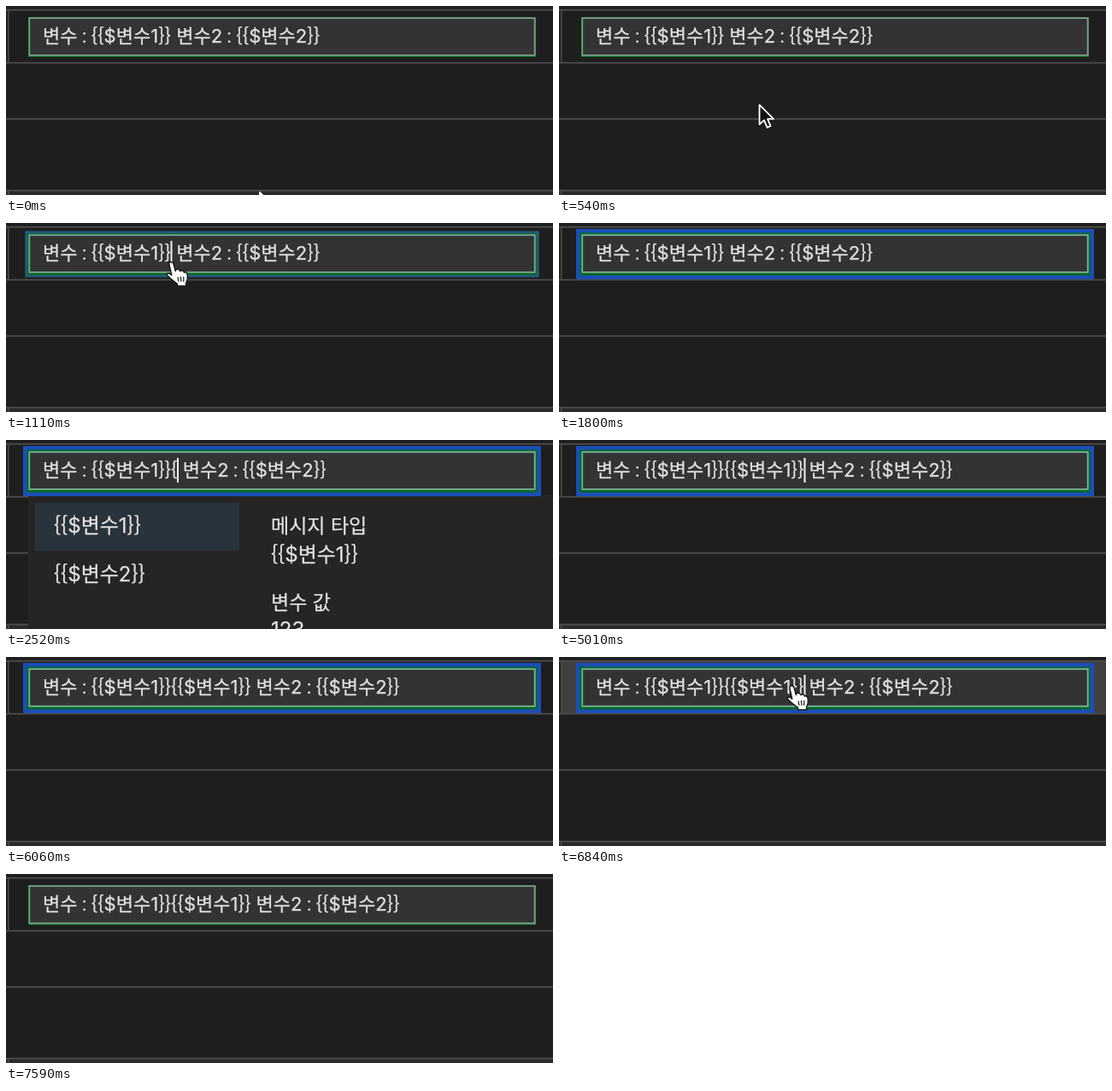
These frames come from a looping animation (640x222 px, 7620 ms). An HTML page:

```html
<!DOCTYPE html>
<html lang="ko">
<head>
<meta charset="utf-8">
<title>변수 자동 완성</title>
<style>
html, body { margin: 0; width: 100%; height: 100%; overflow: hidden; background: #1e1e1e; }
svg { display: block; width: 100%; height: 100%; }
text { font: 22px "Noto Sans CJK KR", "Noto Sans CJK", sans-serif; fill: #e2e2e2; stroke: #e2e2e2; stroke-width: .25px; white-space: pre; }
.num { font-family: Inter, Roboto, sans-serif; }
.colon { font-family: Roboto, sans-serif; }
#popup text { font-size: 24px; }
#popup .label { font-size: 23px; }
.rule { fill: #4c4c4c; }
</style>
</head>
<body>
<svg viewBox="0 0 640 222">
  <defs>
    <filter id="soft" x="-5%" y="-20%" width="110%" height="140%"><feGaussianBlur stdDeviation="0.7"/></filter>
  </defs>
  <rect width="640" height="222" fill="#1e1e1e"/>
  <rect y="217" width="640" height="5" fill="#2a2a2a"/>
  <rect id="hover" x="3" y="5" width="637" height="61" fill="#404040"/>
  <g class="rule">
    <rect y="3.8" width="640" height="1.8"/>
    <rect y="65.8" width="640" height="1.8"/>
    <rect y="131.8" width="640" height="1.8"/>
    <rect y="215.8" width="640" height="1.8"/>
    <rect x="2" y="5" width="1.5" height="61"/>
    <rect x="2" y="217" width="1.5" height="5"/>
  </g>

  <g id="popup">
    <rect x="26" y="66" width="614" height="156" fill="#252526"/>
    <rect x="34" y="73.5" width="239" height="57" fill="#29333c"/>
    <text x="56" y="109">{{$변수1}}</text>
    <text x="56" y="166">{{$변수2}}</text>
    <text x="310" y="109" class="label">메시지 타입</text>
    <text x="310" y="143">{{$변수1}}</text>
    <text x="310" y="199" class="label">변수 값</text>
    <text x="310" y="231">123</text>
  </g>

  <rect id="glow" fill="#07691f" filter="url(#soft)"/>
  <rect id="ring" fill="none" filter="url(#soft)"/>
  <rect id="field" x="27.3" y="14.2" width="591.4" height="43.6" fill="#333" stroke-width="1.8"/>
  <rect x="28.2" y="15" width="1.3" height="42" fill="#0c5a24"/>
  <text id="value" x="43" y="43"></text>
  <rect id="caret" y="21" width="2" height="29" fill="#f2f2f2"/>

  <g id="pointer" stroke-linejoin="round">
    <path id="arrow" d="M0 0V23L5.4 18L9 26.5L13 24.8L9.4 16.6H16.5Z" fill="#111" stroke="#fff" stroke-width="1.8"/>
    <g id="hand" stroke="#151515" stroke-width="1.4">
      <path fill="#fff" d="M-1 3C-2-.8 3-1.5 4 2L6.3 10.5C7 8 7 8.5 8 8.6C10 8 11.4 9 11.8 10.6C14 9 16 10.2 16.4 12C19 11 20 13 20.3 15.5C21 20 20 22 18.6 24.5V28H8.5V25.5C5 23-1 18.5-3.6 15C-4.5 12.5-1.5 12 1.8 15.2Z"/>
      <path fill="none" stroke-width="1.2" d="M9 17.5L10 23M12.4 17L13 23M15.8 17V23"/>
    </g>
  </g>
</svg>
<script>
const LOOP = 7620, BLINK = 450, BLUR = 7260;
const $ = id => document.getElementById(id);

// What stands between the two halves of the text, and where the caret is
const edits = [
  { from: 1050, added: "", caret: 192.5 },
  { from: 2280, added: "{", caret: 200 },
  { from: 3810, added: "{{$변수1}}", caret: 286.5 }
];

// The pointer enters, rests on the field, then leaves
const visits = [
  { enter: 0, rest: 960, leave: 1260, exit: 1590, hover: 1110,
    start: [297, 219], spot: [192, 46], end: [242, 232] },
  { enter: 6230, rest: 6750, leave: 7020, exit: 7530, hover: 6600,
    start: [302, 188], spot: [271, 34], end: [306, 226] }
];

function ease(from, to, t) {
  const p = Math.min(1, Math.max(0, (t - from) / (to - from)));
  return p * p * (3 - 2 * p);
}

// Rises at "on", falls at "off"
const pulse = (t, on, off, rise, fall = rise) =>
  ease(on, on + rise, t) * (1 - ease(off, off + fall, t));

const mix = (a, b, p) => a.map((v, i) => v + (b[i] - v) * p);
const rgb = (a, b, p) => `rgb(${mix(a, b, p).map(Math.round)})`;

function set(id, attrs) {
  for (const key in attrs) $(id).setAttribute(key, attrs[key]);
}

function write(el, str) {
  if (el.dataset.now === str) return;
  el.dataset.now = str;
  el.innerHTML = str
    .replace(/[$\d]+/g, m => `<tspan class='num'>${m}</tspan>`)
    .replace(/ : /g, m => `<tspan class='colon'>${m}</tspan>`);
}

// Rectangle around the field, grown by "out" on each side
const around = out => ({ x: 26 - out, y: 13 - out, width: 594 + 2 * out, height: 47 + 2 * out });

function drawField(t, added) {
  const f = pulse(t, 990, BLUR, 270, 240);
  const stroke = 1.5 + 3 * f;
  set("glow", around(2.5 * f));
  set("ring", {
    ...around(2 + 4 * f - stroke / 2),
    stroke: rgb([50, 120, 115], [26, 78, 184], f),
    "stroke-width": stroke,
    opacity: Math.min(1, f * 2)
  });
  set("field", { stroke: rgb([130, 158, 142], [126, 178, 160], f) });
  write($("value"), `변수 : {{$변수1}}${added} 변수2 : {{$변수2}}`);
}

function drawCaret(t, edit) {
  const age = t - edit.from;
  const lit = age >= 0 && t < BLUR && Math.floor(age / BLINK) % 2 === 0;
  set("caret", { x: edit.caret, opacity: +lit });
}

function drawPointer(t) {
  const v = visits.find(v => t >= v.enter && t < v.exit);
  set("pointer", { visibility: v ? "visible" : "hidden" });
  if (!v) return;
  const [x, y] = t < v.leave
    ? mix(v.start, v.spot, ease(v.enter, v.rest, t))
    : mix(v.spot, v.end, ease(v.leave, v.exit, t));
  set("pointer", { transform: `translate(${x} ${y})` });
  set("hand", { opacity: y < 66 ? 1 : 0 });
  set("arrow", { opacity: y < 66 ? 0 : 1 });
}

function draw(t) {
  const edit = edits.findLast(e => t >= e.from) || edits[0];
  set("hover", { opacity: Math.max(...visits.map(v => pulse(t, v.hover, v.leave + 150, 160))) });
  set("popup", { opacity: pulse(t, 2370, 3840, 120) });
  drawField(t, edit.added);
  drawCaret(t, edit);
  drawPointer(t);
}

document.querySelectorAll("#popup text").forEach(el => write(el, el.textContent));

const begin = performance.now();
function tick() {
  draw((performance.now() - begin) % LOOP);
  requestAnimationFrame(tick);
}
tick();
</script>
</body>
</html>
```
